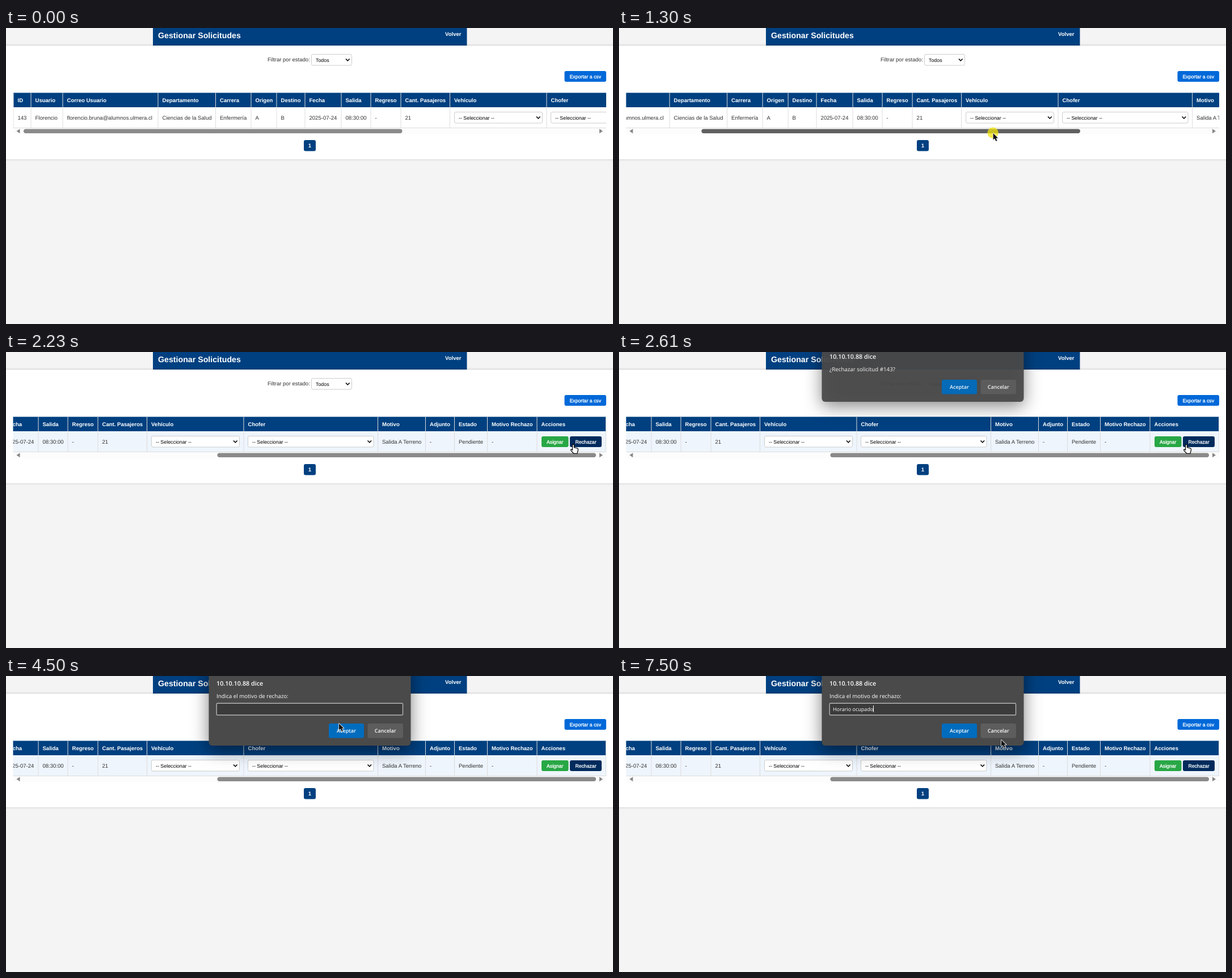
Animation of 1070x523 px, one loop 8 s. Source, as an HTML page with a canvas:

```html
<!DOCTYPE html>
<html lang="es">
<head>
<meta charset="utf-8">
<title>Gestionar Solicitudes</title>
<style>
  html, body { margin: 0; width: 100%; height: 100%; overflow: hidden; background: #f4f4f4; }
  canvas { display: block; width: 1070px; height: 523px; }
</style>
</head>
<body>
<canvas id="stage" width="1070" height="523"></canvas>
<script>
const ctx = document.getElementById('stage').getContext('2d');
const LOOP = 8000;
const NAVY = '#004080';
const SANS = '"Liberation Sans", Arial, sans-serif';
const UI = '"Open Sans", "Noto Sans", sans-serif';
const VIEW = { left: 13, right: 1058 };
const MAX_SCROLL = 534;

// left edge, heading, cell text
const COLUMNS = [
  [13, 'ID', '143'],
  [44, 'Usuario', 'Florencio'],
  [100, 'Correo Usuario', 'florencio.bruna@alumnos.ulmera.cl'],
  [268, 'Departamento', 'Ciencias de la Salud'],
  [369.5, 'Carrera', 'Enfermería'],
  [432, 'Origen', 'A'],
  [477, 'Destino', 'B'],
  [527, 'Fecha', '2025-07-24'],
  [591, 'Salida', '08:30:00'],
  [643, 'Regreso', '-'],
  [696, 'Cant. Pasajeros', '21'],
  [782.5, 'Vehículo', ''],
  [953, 'Chofer', ''],
  [1189.5, 'Motivo', 'Salida A Terreno'],
  [1273.5, 'Adjunto', '-'],
  [1324.5, 'Estado', 'Pendiente'],
  [1382.5, 'Motivo Rechazo', '-'],
  [1470, 'Acciones', '']
];
const TABLE_END = 1591.5;

// time, x, y, eased
const POINTER = [
  [30, 570, 488], [270, 526, 160, 1], [470, 526, 160], [560, 523, 183],
  [910, 523, 183], [1100, 570, 185], [1300, 659, 186], [1650, 871, 182],
  [1710, 884, 181], [1740, 884, 181], [2130, 1000, 163, 1], [2680, 1000, 163],
  [3340, 588, 72, 1], [4080, 588, 72], [4220, 588, 80], [4470, 588, 80],
  [4500, 587, 84], [4780, 674, 113, 1]
];
const SCROLL = [[910, 0], [1100, 52], [1300, 178], [1650, 485.5], [1710, MAX_SCROLL]];

const REASON = 'Horario ocupado';
const KEY_TIMES = [5700, 5950, 6040, 6130, 6220, 6310, 6400, 6490,
                   6800, 6960, 7060, 7260, 7340, 7420, 7500];

const clamp = v => Math.max(0, Math.min(1, v));
const smooth = p => p * p * (3 - 2 * p);
const between = (t, a, b) => t >= a && t < b;

function track(keys, t) {
  if (t <= keys[0][0]) return keys[0].slice(1);
  for (let i = 1; i < keys.length; i++) {
    const a = keys[i - 1], b = keys[i];
    if (t < b[0]) {
      let p = (t - a[0]) / (b[0] - a[0]);
      if (b[3]) p = smooth(p);
      return [1, 2].map(k => a[k] + (b[k] - a[k]) * p);
    }
  }
  return keys[keys.length - 1].slice(1);
}

function rect(x, y, w, h, color) {
  ctx.fillStyle = color;
  ctx.fillRect(x, y, w, h);
}

function rounded(x, y, w, h, r, fill, stroke, lineWidth = 1) {
  ctx.beginPath();
  ctx.roundRect(x, y, w, h, r);
  ctx.fillStyle = fill;
  ctx.fill();
  if (stroke) {
    ctx.strokeStyle = stroke;
    ctx.lineWidth = lineWidth;
    ctx.stroke();
  }
}

// y is the middle of the capitals
function text(str, x, y, { size = 9.55, weight = 400, family = SANS, color = '#333', align = 'left', heavy } = {}) {
  ctx.font = `${weight} ${size}px ${family}`;
  ctx.textAlign = align;
  ctx.fillStyle = color;
  const base = y + size * 0.36;
  ctx.fillText(str, x, base);
  if (heavy) {
    ctx.strokeStyle = color;
    ctx.lineWidth = 0.3;
    ctx.strokeText(str, x, base);
  }
}

function button(label, x, y, w, h, fill, style = { size: 8.7, heavy: true }) {
  rounded(x, y, w, h, 3, fill);
  text(label, x + w / 2, y + h / 2, { color: '#fff', align: 'center', ...style });
}

function select(label, x, y, w, h) {
  rounded(x, y, w, h, 2.5, '#fff', '#ccc');
  text(label, x + 7.5, y + h / 2 + 0.2, { size: 8.85, color: '#000' });
  const cx = x + w - 7.2, cy = y + h / 2;
  ctx.beginPath();
  ctx.moveTo(cx - 3.3, cy - 1.8);
  ctx.lineTo(cx, cy + 1.7);
  ctx.lineTo(cx + 3.3, cy - 1.8);
  ctx.strokeStyle = '#000';
  ctx.lineWidth = 1.6;
  ctx.stroke();
}

function drawPage() {
  rect(0, 0, 1070, 523, '#f4f4f4');
  rect(259, 0, 553.5, 31, NAVY);
  text('Gestionar Solicitudes', 268, 12.5, { size: 14.2, weight: 700, color: '#fff' });
  text('Volver', 774, 11, { weight: 700, color: '#fff' });

  ctx.save();
  ctx.shadowColor = 'rgba(0,0,0,.22)';
  ctx.shadowBlur = 4;
  rect(-10, 31.3, 1090, 200.7, '#fff');
  ctx.restore();

  text('Filtrar por estado:', 461, 56);
  select('Todos', 538.5, 46.5, 71, 19.5);
  button('Exportar a csv', 984.5, 76, 73.5, 19, '#0069d9');
  button('1', 525, 198, 21, 19.5, NAVY, { weight: 700 });
}

function drawTable(scroll, rowHover, rejectHover) {
  ctx.save();
  ctx.beginPath();
  ctx.rect(VIEW.left - 0.5, 110, VIEW.right - VIEW.left + 0.5, 70);
  ctx.clip();
  ctx.translate(-scroll, 0);

  rect(13, 114.5, TABLE_END - 13, 25.5, NAVY);
  rect(13, 140, TABLE_END - 13, 36, rowHover ? '#eef5fc' : '#fff');
  rect(13, 176, TABLE_END - 13, 1, '#ddd');
  for (const [x, heading, cell] of COLUMNS) {
    rect(x - 0.5, 114.5, 1, 62, '#ddd');
    text(heading, x + 7.5, 127.3, { weight: 700, color: '#fff' });
    text(cell, x + 7.5, 158.2);
  }
  rect(TABLE_END - 0.5, 114.5, 1, 62, '#ddd');

  select('-- Seleccionar --', 790.5, 148.5, 155, 19.5);
  select('-- Seleccionar --', 960.5, 148.5, 221.5, 19.5);
  button('Asignar', 1478, 149, 47.5, 19, '#28a745');
  button('Rechazar', 1528, 149, 56, 19, rejectHover ? '#002b5c' : '#dc3545');
  ctx.restore();
}

function drawScrollbar(scroll, active) {
  rect(13, 177, 1045, 11, '#fcfcfc');
  ctx.fillStyle = '#868686';
  for (const [x, dir] of [[18.5, 1], [1052, -1]]) {
    ctx.beginPath();
    ctx.moveTo(x, 182.3);
    ctx.lineTo(x + 6 * dir, 178.3);
    ctx.lineTo(x + 6 * dir, 186.3);
    ctx.fill();
  }
  const offset = scroll / MAX_SCROLL * 341.5;
  rounded(31 + offset, 178.6, 667.5, 7.4, 3.7, active ? '#606060' : '#8a8a8a');
}

function drawDialog(message, height, rise, alpha, input) {
  if (alpha <= 0) return;
  ctx.save();
  ctx.translate(0, rise);
  ctx.globalAlpha = alpha;
  ctx.save();
  ctx.shadowColor = 'rgba(0,0,0,.5)';
  ctx.shadowBlur = 30;
  ctx.shadowOffsetY = 8;
  rounded(357.5, -40, 356, height + 40, 6, '#4a4a4a');
  ctx.restore();

  const ui = { family: UI, color: '#fff' };
  text('10.10.10.88 dice', 371, 13, { ...ui, size: 10.8, weight: 600 });
  text(message, 371, 35, { ...ui, size: 9.75 });
  if (input) {
    rounded(371.2, 48.2, 328.3, 20.8, 1.5, '#3b3b3b', '#b4b4b4', 1.4);
    text(input.value, 377, 58.5, { ...ui, size: 9.05 });
    if (input.caret) {
      const end = 377 + ctx.measureText(input.value).width;
      rect(Math.round(end), 52, 1, 12, '#fff');
    }
  }
  const label = { family: UI, size: 9, weight: 600 };
  button('Aceptar', 569, height - 39, 62, 25.5, '#006cbe', label);
  button('Cancelar', 637.5, height - 39, 62.5, 25.5, '#5d5d5d', label);
  ctx.restore();
}

function openState(t, start) {
  const left = 1 - clamp((t - start) / 240);
  return { rise: -20 * left * left, alpha: t < start ? 0 : 1 - left ** 4 };
}

function drawDialogs(t) {
  const ask = openState(t, 2490);
  const fade = 1 - clamp((t - 3470) / 130);
  drawDialog('¿Rechazar solicitud #143?', 93, ask.rise, ask.alpha * fade);

  const prompt = openState(t, 3600);
  const typed = KEY_TIMES.filter(k => k <= t).length;
  const caret = typed > 0 || between(t, 3730, 4220) || between(t, 4720, 5210);
  drawDialog('Indica el motivo de rechazo:', 123, prompt.rise, prompt.alpha,
    { value: REASON.slice(0, typed), caret });
}

const ARROW = new Path2D('M0 0V11.6L2.7 9.2L4.8 13.9L6.9 13L4.9 8.4H8.5Z');
const HAND = new Path2D('M-1.4 1.2Q0 -1 1.4 1.2V5.8L7.4 7.2Q8.8 7.8 8.4 10L7 16.2H.6L-4 11Q-4.6 8.6 -2.8 9.2L-1.4 10.4Z');

function drawPointer(t, x, y, hand) {
  const pressed = between(t, 750, 1740) || between(t, 2340, 2490) || between(t, 3370, 3490);
  if (pressed) {
    ctx.beginPath();
    ctx.arc(x - 0.5, y - 0.8, 9.7, 0, Math.PI * 2);
    ctx.fillStyle = 'rgba(240,226,10,.74)';
    ctx.fill();
  }
  ctx.save();
  ctx.translate(x, y);
  ctx.lineJoin = 'round';
  ctx.lineWidth = hand ? 1.1 : 1.5;
  ctx.strokeStyle = hand ? '#000' : '#fff';
  ctx.fillStyle = hand ? '#fff' : '#111';
  const shape = hand ? HAND : ARROW;
  ctx.stroke(shape);
  ctx.fill(shape);
  if (hand) ctx.stroke(shape);
  ctx.restore();
}

function render(t) {
  const [x, y] = track(POINTER, t);
  const [scroll] = track(SCROLL, t);
  const overReject = x > 994 && y < 168;
  const rejectHover = overReject || t > 2130;
  const rowHover = t > 2130 || (t >= 30 && between(y, 140, 176));
  const thumbActive = between(t, 535, 1770);

  ctx.textRendering = 'geometricPrecision';
  drawPage();
  drawTable(scroll, rowHover, rejectHover);
  drawScrollbar(scroll, thumbActive);
  drawDialogs(t);
  if (t >= 30) drawPointer(t, x, y, overReject && t < 2760);
}

function tick() {
  render(performance.now() % LOOP);
  requestAnimationFrame(tick);
}
tick();
</script>
</body>
</html>
```
